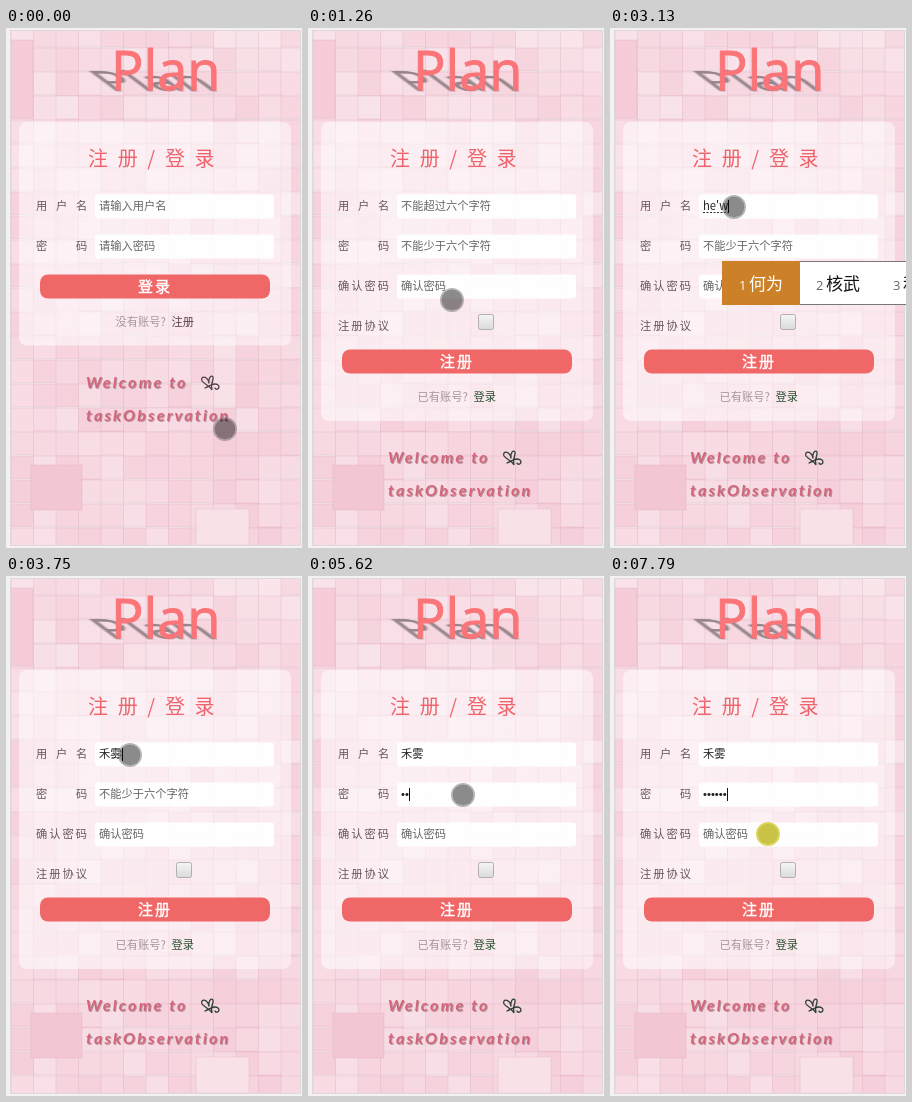
Animation, 296 px wide and 520 px high, one loop 8000 ms. Source, as an HTML page:

```html
<!DOCTYPE html>
<html lang="zh-CN">
<head>
<meta charset="utf-8">
<title>注册 / 登录</title>
<style>
html, body { margin: 0; width: 100%; height: 100%; overflow: hidden; background: #f3f1f2; }
svg { display: block; width: 296px; height: 520px; }
text { font-family: "Noto Sans CJK SC", "Noto Sans CJK", sans-serif; white-space: pre; }
.small text { font-size: 11.25px; }
.logo { font: 54px "Open Sans", "Noto Sans", sans-serif; stroke-width: 1; }
.title { font-size: 20px; letter-spacing: 2.6px; fill: #ee646c; }
.label { fill: #67575d; }
.hint { fill: #666; }
.typed { fill: #222; }
.small .dots { font-family: "Liberation Sans", sans-serif; }
.button { font-size: 15px; letter-spacing: 2px; fill: #fff; stroke: #fff; stroke-width: .4; }
.script { font: italic bold 16px Lato, sans-serif; letter-spacing: 2.2px; }
.cand { font-size: 17px; }
.num { font: 13px "Open Sans", sans-serif; }
</style>
</head>
<body>
<svg viewBox="0 0 296 520">
  <defs>
    <filter id="soft"><feGaussianBlur stdDeviation=".9"/></filter>
    <linearGradient id="panelFill" x2="1" y2=".3">
      <stop offset="0" stop-color="#fff" stop-opacity=".5"/>
      <stop offset=".4" stop-color="#fff" stop-opacity=".56"/>
      <stop offset="1" stop-color="#fff" stop-opacity=".46"/>
    </linearGradient>
    <linearGradient id="boxFill" x2="0" y2="1">
      <stop offset="0" stop-color="#f5f5f5"/>
      <stop offset="1" stop-color="#dadada"/>
    </linearGradient>
    <clipPath id="page"><rect x="5" y="3" width="289" height="514"/></clipPath>
  </defs>
  <rect width="296" height="520" fill="#f3f1f2"/>
  <g id="tiles" clip-path="url(#page)"></g>
  <rect x="4.5" y="2.5" width="290" height="515" fill="none" stroke="#dfd8db"/>

  <text class="logo" transform="matrix(1 0 .67 .5 105 63)" fill="#75686d" stroke="#75686d" opacity=".75" filter="url(#soft)">Plan</text>
  <text class="logo" x="105" y="62" fill="#fb7478" stroke="#fb7478">Plan</text>

  <rect id="panel" x="13" y="94" width="272" rx="8" fill="url(#panelFill)"/>
  <text class="title" x="82" y="138">注 册 / 登 录</text>

  <g class="small">
    <g class="label">
      <text x="30" y="182" letter-spacing="8.8">用户名</text>
      <text x="30" y="222" letter-spacing="28.8">密码</text>
      <g id="extra">
        <text x="30" y="262" letter-spacing="2">确认密码</text>
        <text x="30" y="302" letter-spacing="2">注册协议</text>
        <rect x="170.5" y="286.5" width="15" height="15" rx="2" fill="url(#boxFill)" stroke="#b3aeb0"/>
      </g>
    </g>
    <g id="fields"></g>
    <text id="ask" x="109.5" y="298" fill="#a6969c"></text>
    <text id="link" x="165.5" y="298"></text>
  </g>

  <g id="lower">
    <rect x="34" y="246.5" width="230" height="24" rx="8" fill="#f06767"/>
    <text id="action" class="button" x="132" y="264"></text>
    <g id="scripts"></g>
    <path id="heart" fill="none" stroke-width="1.3" stroke-linecap="round"
      d="M203 355C201 347 194 348 196 353C198 356 203 357 206 362C204 356 208 352 207 349C205 346 202 351 203 355M199 360C204 358 208 354 212 357C215 360 210 363 209 360"/>
  </g>

  <path id="underline" fill="none" stroke="#333" stroke-dasharray="2 1.5"/>
  <rect id="caret" width="1" height="13" fill="#111"/>

  <g id="popup">
    <rect x="112.5" y="233.5" width="190" height="43" fill="#fff" stroke="#777"/>
    <rect x="112" y="233" width="78" height="44" fill="#cc8028"/>
    <g id="cands"></g>
  </g>

  <g id="pointer">
    <circle id="ring" r="11" fill="none" stroke-width="2"/>
    <circle id="disc" r="10.2"/>
  </g>
</svg>
<script>
const LOOP = 8000, BEAT = 312;
const NAME = "禾雾";
const $ = id => document.getElementById(id);

function set(el, attrs) {
  for (const k in attrs) el.setAttribute(k, attrs[k]);
}
function add(parent, tag, attrs, text = "") {
  const el = document.createElementNS("http://www.w3.org/2000/svg", tag);
  set(el, attrs);
  el.textContent = text;
  return parent.appendChild(el);
}
const show = (el, on) => set(el, { visibility: on ? "visible" : "hidden" });

// Small squares under larger ones, a little darker towards the bottom
function drawTiles() {
  let seed = 29;
  const rnd = () => (seed = (seed * 16807) % 2147483647) / 2147483647;
  const tile = (x, y, w, h, light) => add($("tiles"), "rect", {
    x, y, width: w, height: h, fill: `hsl(342 66% ${light}%)`,
    stroke: "#d59bae", "stroke-opacity": .3, "stroke-width": .8
  });
  for (let y = -4; y < 520; y += 24) {
    for (let x = 5; x < 296; x += 22.5) {
      const size = rnd() < .3 ? 45 : 23;
      tile(x, y, size, size, 91.8 - y / 400 + (rnd() - .5) * 4);
    }
  }
  tile(5, 12, 22, 78, 88);
  tile(25, 437, 51, 45, 86.5);
  tile(190, 481, 53, 36, 93);
}
drawTiles();

const rows = [0, 1, 2].map(i => {
  const y = 166.5 + 40 * i;
  const g = add($("fields"), "g", {});
  add(g, "rect", { x: 89, y, width: 179, height: 24, rx: 3, fill: "#fff", "fill-opacity": .94 });
  return { g, text: add(g, "text", { x: 93, y: y + 15.5 }) };
});

["Welcome to", "taskObservation"].forEach((s, i) => {
  const y = 360 + 33 * i;
  add($("scripts"), "text", { class: "script", x: 81, y: y + 1, fill: "#77585f", opacity: .5 }, s);
  add($("scripts"), "text", { class: "script", x: 80, y, fill: "#d5647a" }, s);
});

const cands = [0, 1, 2].map(i => {
  const x = 129 + 77 * i;
  add($("cands"), "text", { class: "num", x, y: 262, fill: i ? "#666" : "#fff" }, i + 1);
  return add($("cands"), "text", { class: "cand", x: x + 10, y: 262, fill: i ? "#111" : "#fff" });
});

// Pointer stops: beat, x, y
const stops = [
  [0, 219, 401], [1, 145, 292], [2, 146, 298], [4, 144, 272], [5, 134, 200],
  [6, 124, 179], [14, 155, 219], [23, 155, 227], [24, 158, 258]
];
const presses = [3, 7, 15, 25];
const blinks = [9, 13, 14, 23];
const ime = {
  10: { keys: "he'w", words: ["何为", "核武", "和我"] },
  11: { keys: "he'wu", words: [NAME, "何物", "和"] }
};

function fill(row, value, hint, cls = "") {
  row.text.textContent = value || hint;
  set(row.text, { class: value ? "typed " + cls : "hint" });
  return 93 + (value ? row.text.getComputedTextLength() : 0);
}

function render(t) {
  const beat = Math.floor((t + 12) / BEAT);
  const signup = beat >= 4;
  const shift = { transform: `translate(0 ${signup ? 75 : 0})` };

  set($("panel"), { height: signup ? 299 : 223.5 });
  for (const id of ["lower", "ask", "link"]) set($(id), shift);
  show($("extra"), signup);
  show(rows[2].g, signup);
  $("action").textContent = signup ? "注册" : "登录";
  $("ask").textContent = signup ? "已有账号?" : "没有账号?";
  $("link").textContent = signup ? "登录" : "注册";
  set($("link"), { fill: signup ? "#27502f" : "#584249" });
  set($("heart"), { stroke: signup ? "#2b4030" : "#51454a" });

  const typing = ime[beat];
  const user = typing ? typing.keys : beat > 11 ? NAME : "";
  const count = Math.max(0, Math.min(6, Math.floor(1.6 * (beat - 17) + .5)));
  const ends = [
    fill(rows[0], user, signup ? "不能超过六个字符" : "请输入用户名"),
    fill(rows[1], "•".repeat(count), signup ? "不能少于六个字符" : "请输入密码", "dots")
  ];
  fill(rows[2], "", "确认密码");

  const focus = beat < 16 ? 0 : 1;
  show($("caret"), beat >= 8 && !blinks.includes(beat));
  set($("caret"), { x: Math.round(ends[focus]), y: 172 + focus * 40 });

  show($("popup"), typing);
  show($("underline"), typing);
  if (typing) {
    cands.forEach((el, i) => el.textContent = typing.words[i]);
    set($("underline"), { d: `M93 184.5H${ends[0]}` });
  }

  const [, x, y] = stops.filter(s => s[0] <= beat).pop();
  const down = presses.includes(beat);
  set($("pointer"), { transform: `translate(${x} ${y})` });
  set($("disc"), { fill: down ? "rgba(184,176,10,.76)" : "rgba(0,0,0,.45)" });
  set($("ring"), { stroke: down ? "rgba(208,200,40,.75)" : "rgba(110,110,110,.5)" });
}

const start = performance.now();
function tick() {
  render((performance.now() - start) % LOOP);
  requestAnimationFrame(tick);
}
tick();
</script>
</body>
</html>
```
